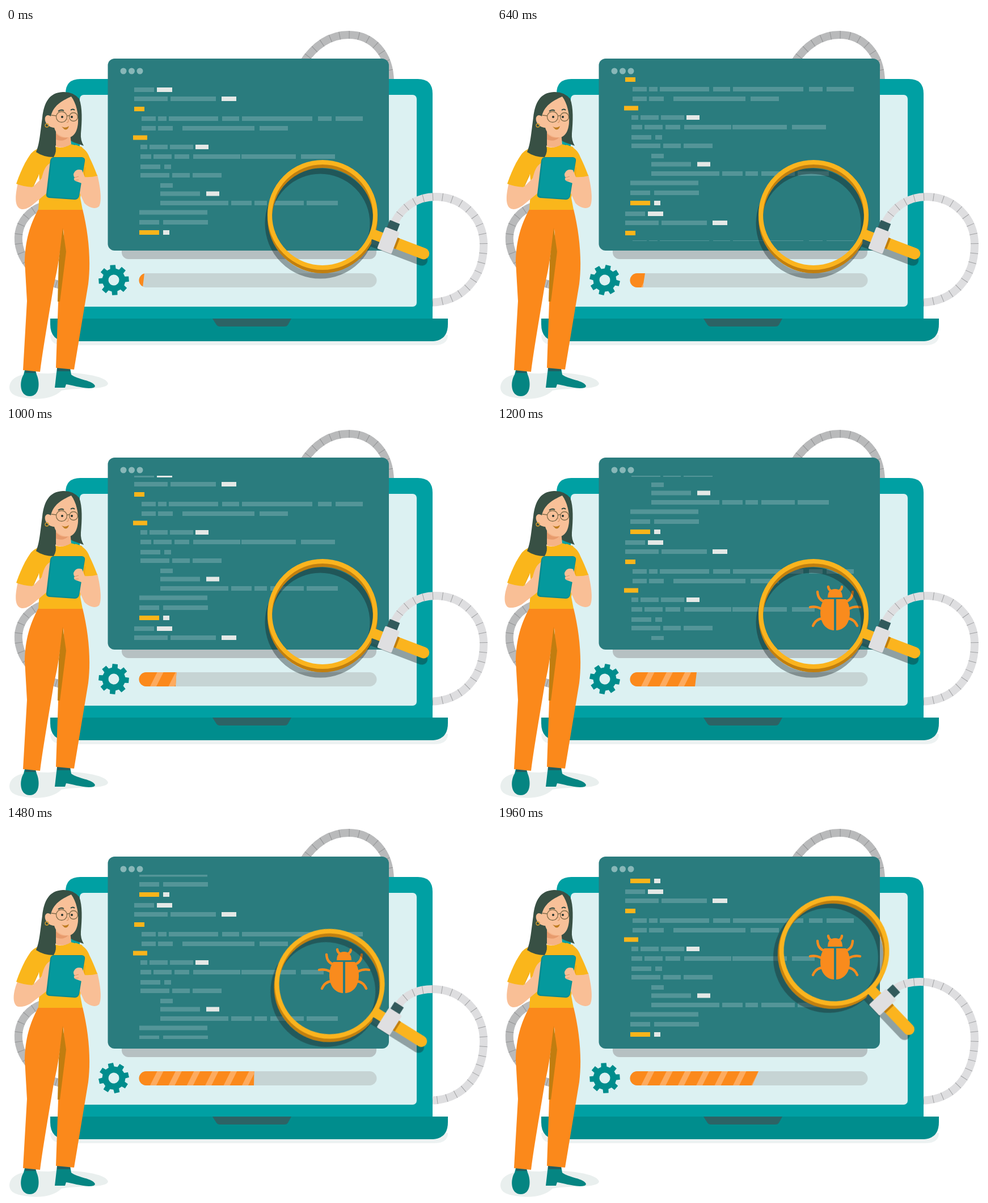
These frames come from a looping animation (855x655 px, 2000 ms). An HTML page:

```html
<!DOCTYPE html>
<html lang="en">
<head>
<meta charset="utf-8">
<title>Code scan</title>
<style>
  html, body { margin: 0; width: 100%; height: 100%; overflow: hidden; background: #fff; }
  svg { display: block; width: 855px; height: 655px; }
  .hose { fill: none; stroke-width: 14; }
  .joints { fill: none; stroke-width: 14; stroke-dasharray: 1 16; stroke: #77787a; stroke-opacity: .6; }
</style>
</head>
<body>
<svg viewBox="0 0 855 655" xmlns="http://www.w3.org/2000/svg">
  <defs>
    <clipPath id="pane"><rect x="180" y="86" width="495" height="290"/></clipPath>
    <clipPath id="done"><polygon id="edge"/></clipPath>
    <clipPath id="pill"><rect x="234.5" y="433" width="419" height="25" rx="12.5"/></clipPath>
    <path id="topHose" d="M522 64C544 30 572 12 604 12C646 12 677 46 677 96"/>
    <path id="sideHose" d="M64 314C16 332 8 386 45 425C60 441 80 451 104 456"/>
  </defs>

  <g stroke="#b9babb">
    <use href="#topHose" class="hose"/>
    <use href="#sideHose" class="hose"/>
  </g>
  <use href="#topHose" class="joints"/>
  <use href="#sideHose" class="joints"/>

  <!-- laptop -->
  <path d="M78 542H779Q779 560 755 560H102Q78 560 78 542Z" fill="#edf2f2"/>
  <path d="M105 514V116Q105 90 131 90H726Q752 90 752 116V514Z" fill="#00a0a3"/>
  <rect x="130" y="118" width="594" height="374" rx="7" fill="#dcf1f2"/>
  <path d="M78 513H779V523Q779 553 749 553H108Q78 553 78 523Z" fill="#008d8d"/>
  <path d="M364 513H503L497 524Q495 527 491 527H377Q373 527 371 524Z" fill="#2c6365"/>

  <!-- code window -->
  <rect x="204" y="370" width="449" height="38" rx="12" fill="#b6c0c2"/>
  <rect x="179.500" y="54" width="495.500" height="339" rx="12" fill="#2a7c7e"/>
  <g fill="#88b7b8">
    <circle cx="207" cy="76" r="5.500"/><circle cx="221.500" cy="76" r="5.500"/><circle cx="236" cy="76" r="5.500"/>
  </g>
  <g clip-path="url(#pane)">
    <g id="code">
      <g id="rows"></g>
      <g transform="translate(596 767)">
        <rect x="-36" y="-20" width="72" height="42" fill="#2a7c7e"/>
        <g fill="none" stroke="#f98b1d" stroke-width="4.300" stroke-linecap="round">
          <path id="legs" d="M-8 -31Q-12 -34 -12 -38M-31 -29Q-30 -14 -18 -12M-44 -2Q-34 -4 -24 1M-39 31Q-34 19 -22 18"/>
          <use href="#legs" transform="scale(-1 1)"/>
        </g>
        <path d="M-13 -19Q-13 -34 0 -34Q13 -34 13 -19Z" fill="#f98b1d"/>
        <path d="M-2 -16V39C-18 38 -26 24 -26 8Q-26 -7 -19 -16ZM2 -16V39C18 38 26 24 26 8Q26 -7 19 -16Z" fill="#f98b1d"/>
      </g>
    </g>
  </g>

  <!-- progress -->
  <rect x="234.500" y="433" width="419" height="25" rx="12.500" fill="#c6d4d4"/>
  <g clip-path="url(#pill)">
    <g clip-path="url(#done)">
      <rect x="234" y="433" width="420" height="25" fill="#fb891b"/>
      <path id="stripes" fill="#fdab5f"/>
    </g>
  </g>
  <path id="gear" fill="#008d8d" fill-rule="evenodd"/>

  <!-- magnifier -->
  <path id="cord" class="hose" stroke="#dedee0"/>
  <path id="cordJoints" class="joints"/>
  <g id="lens">
    <g opacity=".38">
      <circle cx="-4" cy="15" r="92.500" fill="none" stroke="#111c1e" stroke-width="10"/>
      <path d="M95 -10H192A10 10 0 0 1 192 10H95Z" transform="translate(-4 11) rotate(21)" fill="#111c1e"/>
    </g>
    <circle cy="6" r="93" fill="none" stroke="#c17f0f" stroke-width="8"/>
    <g transform="rotate(21)">
      <path d="M94 -9H114V9H94Z" fill="#fbb41e"/>
      <path d="M96 9H114V17H99Z" fill="#2e5b5d"/>
      <path d="M134 -10H191A10 10 0 0 1 191 10H134Z" fill="#fbb41e"/>
      <path d="M137 -10H142V10H137Z" fill="#c17f0f"/>
      <rect x="114" y="-34" width="19" height="16" fill="#325a5c"/>
      <rect x="111" y="-20" width="27" height="41" rx="2" fill="#dfdfe1"/>
    </g>
    <circle r="93" fill="none" stroke="#fbb41e" stroke-width="8"/>
  </g>

  <!-- woman -->
  <path d="M6 634C8 610 40 608 75 610C110 605 178 612 180 628C176 640 130 634 98 640C84 654 60 656 42 654C20 652 6 648 6 634Z" fill="#e9efee"/>
  <g fill="#058582">
    <path d="M33 604H52L54 612C60 625 60 650 42 650C24 650 23 625 31 612Z"/>
    <path d="M90 600H113L115 612C126 621 154 622 157 632Q157 636 146 636C130 635 118 631 106 629L104 635H86Z"/>
  </g>
  <path d="M34 604H52V609H34ZM90 600H113V606H90Z" fill="#205f61"/>
  <path d="M57 320H135C146 365 150 412 145 452L120 603L88 600L92 485C96 455 106 400 101 355C96 390 92 422 84 455C76 505 66 560 60 607L30 604L37 482L33 412C34 375 42 348 57 320Z" fill="#fb891b"/>
  <path d="M100 353L106 395L95 483H91L93 410Z" fill="#c17d10"/>
  <path d="M84 208Q98 215 114 205L134 210L140 235L131 300L135 321H57L60 278L54 214L66 211Z" fill="#fab61b"/>
  <path id="arm" fill="#f9bf96"/>
  <path d="M137 260L161 259C167 284 169 306 164 315C157 321 146 317 138 309L122 274L134 262Z" fill="#f9bf96"/>
  <path d="M66 211C54 212 47 218 43 223C33 237 25 255 18 275Q30 280 47 281L64 246Z" fill="#fab61b"/>
  <path d="M122 206C136 210 143 217 147 228C153 240 157 250 161 261Q150 264 137 263L130 235Z" fill="#fab61b"/>
  <path d="M57 260L48 280M139 246L138 263" stroke="#e29c12" stroke-width="1" fill="none"/>
  <path d="M100 113C76 114 67 132 64 158C60 188 59 205 53 219Q66 228 84 228Q90 218 87 208L112 198L120 202L137 208Q131 198 132 186C134 165 135 140 129 125Q118 112 100 113Z" fill="#385044"/>
  <path d="M88 176V209Q101 214 115 205L113 185Z" fill="#f5b387"/>
  <path d="M115 121C124 133 128 152 127 167C126 184 118 195 107 193C96 192 88 187 85 176C76 176 67 167 69 158Q72 151 79 156C83 138 97 129 115 121Z" fill="#f8c098"/>
  <path d="M88 186Q97 196 110 193Q101 202 88 197Z" fill="#e79b6d"/>
  <g fill="none" stroke="#806b49" stroke-width="1.300">
    <circle cx="98" cy="157" r="9.500"/><circle cx="119" cy="157" r="7.500"/>
    <path d="M107.500 156Q110 153 112 156M80 154L89 155"/>
    <path d="M109 161Q112 166 107 167" stroke="#dc9768"/>
    <circle cx="72" cy="172" r="3" stroke="#d69c29"/>
  </g>
  <path d="M92 147Q97 143 102 146M114 145Q118 142 121 145" fill="none" stroke="#27443d" stroke-width="1.800"/>
  <circle cx="99" cy="157" r="2" fill="#27332f"/><circle cx="116" cy="157" r="2" fill="#27332f"/>
  <path d="M98 174Q105 178 111 173Q109 181 103 179Z" fill="#bf7c20"/>
  <path d="M85 228H134Q140 229 139 235L129 297Q127 303 121 303L76 300Q70 299 71 293L78 234Q79 228 85 228Z" fill="#08898d"/>
  <path d="M86 229H134Q139 230 138 235L128 296Q126 301 121 301L78 298Q73 297 74 292L80 234Q81 229 86 229Z" fill="#05999d"/>
  <path d="M121 254Q125 248 134 251L139 263L133 274L122 270Q118 267 121 264Q117 259 121 254Z" fill="#f9bf96"/>
  <path d="M121 264L128 262M122 269L128 268" stroke="#dc9768" fill="none"/>
</svg>
<script>
const LOOP = 2000, STEP = 40, PERIOD = 271;
const $ = id => document.getElementById(id);
const set = (id, name, value) => $(id).setAttribute(name, value);

// Each row: centre y, then bars as start-end; w = white, y = yellow.
const rows = `109 226-261 w266-293
125 226-285 290-370 w380-406
143 y226-244
160 239-264 268-283 287-374 381-411 416-540 550-574 581-629
177 239-264 268-294 311-438 447-497
193.5 y224-249
210 237-249 253-285 289-330 w334-357
227 237-256 260-292 297-323 330-413 415-511 520-580
245 237-272 279-291
260 237-288 293-324 329-380
278 272-294
292.5 272-342 w353-376
309 272-392 397-433 438-460 466-525 530-585
325.5 235-355
343 235-270 277-356
361 y235-270 w277-288`;
const ink = { w: '#e4e8e6', y: '#fbb41a' };

function codeBlock(shift) {
  return rows.split('\n').map(row => {
    const [y, ...bars] = row.split(' ');
    return bars.map(bar => {
      const [a, b] = bar.replace(/[wy]/, '').split('-');
      return `<rect x="${a}" y="${+y - 4 + shift}" width="${b - a}" height="8" fill="${ink[bar[0]] || '#549598'}"/>`;
    }).join('');
  }).join('');
}
$('rows').innerHTML = [0, 1, 2].map(k => codeBlock(k * PERIOD)).join('');

let stripes = '';
for (let x = 254; x < 640; x += 32.4) stripes += `M${x} 458l12.5 -25h11l-12.5 25Z`;
set('stripes', 'd', stripes);

function gearPath() {
  const pts = [];
  for (let i = 0; i < 8; i++) {
    for (const [deg, r] of [[-14, 20.5], [-10, 27], [10, 27], [14, 20.5]]) {
      const a = (i * 45 + deg) * Math.PI / 180;
      pts.push(`${(r * Math.cos(a)).toFixed(2)} ${(r * Math.sin(a)).toFixed(2)}`);
    }
  }
  return `M${pts.join('L')}ZM-9.5 0a9.5 9.5 0 1 0 19 0a9.5 9.5 0 1 0 -19 0Z`;
}
set('gear', 'd', gearPath());

// Smooth monotone curve through [time, value] points.
function curve(pts) {
  const slope = pts.slice(1).map(([t, v], i) => (v - pts[i][1]) / (t - pts[i][0]));
  const tan = pts.map((_, i) => {
    const a = slope[i - 1], b = slope[i];
    return a > 0 && b > 0 ? 2 * a * b / (a + b) : 0;
  });
  return t => {
    let i = 0;
    while (i < pts.length - 2 && t > pts[i + 1][0]) i++;
    const [t0, v0] = pts[i], [t1, v1] = pts[i + 1], h = t1 - t0;
    const u = (t - t0) / h, w = 1 - u;
    return v0 * (1 + 2 * u) * w * w + v1 * u * u * (3 - 2 * u)
      + h * u * w * (tan[i] * w - tan[i + 1] * u);
  };
}
const scroll = curve([[0, 0], [320, 9.5], [640, 52], [1000, 295], [1200, 447], [1480, 511], [1960, 535], [2000, 536]]);
const barTop = curve([[0, 244], [320, 247.5], [640, 261], [1000, 300.5], [1200, 352], [1480, 437.5], [1960, 461], [2000, 462]]);
const barLow = curve([[0, 241], [320, 243.5], [640, 257], [1000, 299], [1200, 349], [1480, 437], [1960, 450], [2000, 451]]);

const ease = (t, from, to) => {
  const u = Math.min(1, Math.max(0, (t - from) / (to - from)));
  return (1 - Math.cos(Math.PI * u)) / 2;
};

function drawLens(p) {
  const x = 558 + 36.5 * p * (0.625 + 0.375 * p);
  const y = 330 - 109.5 * p * (1.137 - 0.137 * p);
  const turn = 25.5 * p;
  set('lens', 'transform', `translate(${x} ${y}) rotate(${turn})`);

  const a = (21 + turn) * Math.PI / 180, c = Math.cos(a), s = Math.sin(a);
  const sx = x + 123 * c + 33 * s, sy = y + 123 * s - 33 * c;
  const tx = 757 - 11 * p, ty = 298 - 23 * p;
  const d = `M${sx} ${sy}C${sx + 15 - 6 * p} ${sy - 29 + 21 * p} ${tx - 31 + 15 * p} ${ty} ${tx} ${ty}`
    + `C${tx + 48 + 6 * p} ${ty} 842 ${335 - 15 * p} 842 ${383 - 8 * p}C842 440 806 482 752 484.5`;
  set('cord', 'd', d);
  set('cordJoints', 'd', d);
}

function drawArm(t) {
  const phase = t % 1000;
  const k = 4 * (ease(phase, 0, 170) - ease(phase, 480, 680));
  set('arm', 'd', `M21 273C${18 - k} 288 ${13 - k} 312 ${24 - k} 318.5C${30 - k} ${322 - k / 2} ${38 - k} 319 ${46 - k / 2} 313`
    + 'L76 288L79 238C69 242 65 256 63 265L47 281Z');
}

function draw(t) {
  const s = scroll(t);
  set('code', 'transform', `translate(0 ${-s})`);
  set('edge', 'points', `230,433 ${barTop(t)},433 ${barLow(t)},458 230,458`);
  set('gear', 'transform', `translate(190 445) rotate(${s / 536 * 180 - 4})`);
  drawLens(ease(t, 1200, 1810));
  drawArm(t);
}

const start = performance.now();
function tick() {
  const t = Math.max(0, performance.now() - start) % LOOP;
  draw(Math.floor((t + 1) / STEP) * STEP % LOOP);
  requestAnimationFrame(tick);
}
tick();
</script>
</body>
</html>
```
